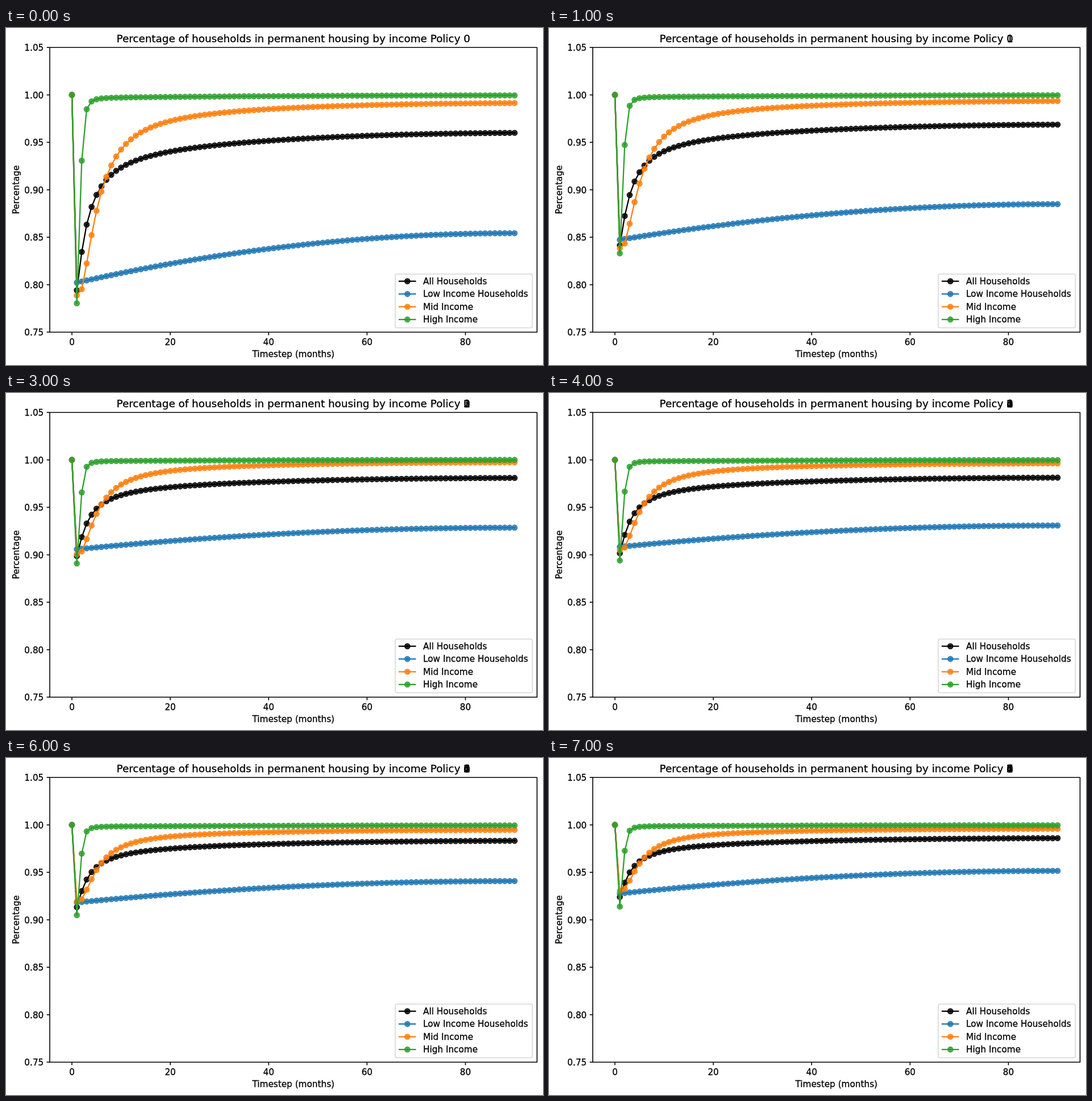
These frames come from a looping animation (945x593 px, 8 s). An HTML page with a canvas:

```html
<!DOCTYPE html>
<html lang="en">
<head>
<meta charset="utf-8">
<title>Permanent housing by income</title>
<style>
  html, body { margin: 0; width: 100%; height: 100%; overflow: hidden; background: #fff; }
  canvas { display: block; width: 945px; height: 593px; }
</style>
</head>
<body>
<canvas id="chart"></canvas>
<script>
const W = 945, H = 593, STEP = 1000, MONTHS = 90;
const LEFT = 77, RIGHT = 934.5, TOP = 34.2, BOTTOM = 535.2;
const MID_X = (LEFT + RIGHT) / 2;
const FONT = '"DejaVu Sans", sans-serif';

// Where each policy lies along the key values below.
const POLICIES = [0, 1, 2, 3, 3.33, 4, 4.33, 5];

// low, high: share after the shock and at the end, by policy.
// The recovery mixes a fast rise (rate, power, delay) with a slow drift.
const series = [
  {
    name: 'All Households', color: '#000000',
    drift: .1, rate: .36, power: 1.2, delay: 0,
    low: [.7941, .8414, .8762, .8986, .9079, .9241],
    high: [.96, .9687, .975, .981, .9819, .986]
  },
  {
    name: 'Low Income Households', color: '#1f77b4',
    drift: 1, rate: 1, power: 1, delay: 0,
    low: [.8022, .8474, .8822, .9058, .9136, .9277],
    high: [.8543, .8849, .9106, .9286, .9355, .9516]
  },
  {
    name: 'Mid Income', color: '#ff7f0e',
    drift: .05, rate: .106, power: 1.65, delay: .5,
    low: [.7887, .8384, .8789, .9004, .9136, .9304],
    high: [.9914, .9935, .9941, .9974, .9941, .9959]
  },
  {
    name: 'High Income', color: '#2ca02c',
    drift: .012, rate: 2.27, power: 2.9, delay: 0,
    low: [.7804, .833, .8681, .8908, .9004, .9139],
    high: [.9995, .9996, .9992, 1, .9993, .9996]
  }
];

const px = month => 116 + month * 8.656;
const py = value => 117.7 + (1 - value) * 1670;
const mix = (a, b, k) => a + (b - a) * k;

function sample(keys, at) {
  const i = Math.floor(at);
  return mix(keys[i], keys[i + 1] ?? keys[i], at - i);
}

// Share of the recovery still to come: 1 in month 1, 0 in the last month.
function gap(month, { drift, rate, power, delay }) {
  const rise = m => 1 / (1 + rate * Math.max(0, m - 1 - delay) ** power);
  const rest = rise(MONTHS);
  const fast = (rise(month) - rest) / (1 - rest);
  const slow = ((MONTHS - month) / (MONTHS - 1)) ** 2;
  return mix(fast, slow, drift);
}

function curve(s, policy) {
  const at = POLICIES[policy];
  const low = sample(s.low, at), high = sample(s.high, at);
  const points = [[px(0), py(1)]];
  for (let m = 1; m <= MONTHS; m++) points.push([px(m), py(mix(high, low, gap(m, s)))]);
  return points;
}

const canvas = document.getElementById('chart');
const ctx = canvas.getContext('2d');
const ratio = window.devicePixelRatio || 1;
canvas.width = W * ratio;
canvas.height = H * ratio;
ctx.scale(ratio, ratio);

function text(str, x, y, align = 'center', size = 15.28) {
  ctx.font = `${size}px ${FONT}`;
  ctx.textAlign = align;
  ctx.fillStyle = ctx.strokeStyle = '#000';
  ctx.lineWidth = .3;
  ctx.fillText(str, x, y);
  ctx.strokeText(str, x, y);
}

function path(points, color, width) {
  ctx.beginPath();
  points.forEach(([x, y]) => ctx.lineTo(x, y));
  ctx.strokeStyle = color;
  ctx.lineWidth = width;
  ctx.lineJoin = 'round';
  ctx.stroke();
}

function disc(x, y, r) {
  ctx.beginPath();
  ctx.arc(x, y, r, 0, Math.PI * 2);
}

function marker([x, y], color) {
  ctx.fillStyle = ctx.strokeStyle = color;
  ctx.lineWidth = 1.53;
  ctx.globalAlpha = .78;
  disc(x, y, 4.58);
  ctx.fill();
  ctx.globalAlpha = .9;
  ctx.stroke();
  disc(x, y, 2.3);
  ctx.fill();
  ctx.globalAlpha = 1;
}

function plot(points, color, marked = points) {
  path(points, color, 2.29);
  marked.forEach(p => marker(p, color));
}

function axes() {
  ctx.strokeStyle = '#000';
  ctx.lineWidth = 1.6;
  ctx.strokeRect(LEFT, TOP, RIGHT - LEFT, BOTTOM - TOP);
  for (let m = 0; m <= 80; m += 20) {
    path([[px(m), BOTTOM], [px(m), BOTTOM + 5.4]], '#000', 1.6);
    text(m, px(m), 558);
  }
  for (let i = 0; i <= 6; i++) {
    const v = .75 + i * .05, y = py(v);
    path([[LEFT - 5.4, y], [LEFT, y]], '#000', 1.6);
    text(v.toFixed(2), 66.3, y + 5.8, 'right');
  }
  text('Timestep (months)', MID_X, 579);
  ctx.save();
  ctx.translate(22.5, 284.6);
  ctx.rotate(-Math.PI / 2);
  text('Percentage', 0, 0);
  ctx.restore();
}

function legend() {
  ctx.beginPath();
  ctx.roundRect(685, 433, 241.3, 94.6, 3);
  ctx.fillStyle = 'rgba(255,255,255,.8)';
  ctx.fill();
  ctx.strokeStyle = '#d6d6d6';
  ctx.lineWidth = 1.53;
  ctx.stroke();
  series.forEach(({ name, color }, i) => {
    const y = 445.6 + i * 22.45;
    plot([[691, y], [721.5, y]], color, [[706.3, y]]);
    text(name, 734, y + 5.4, 'left');
  });
}

// Titles pile up: every earlier policy number stays underneath.
function title(policy) {
  const str = 'Percentage of households in permanent housing by income Policy 0';
  text(str, MID_X, 25, 'center', 18.36);
  const end = MID_X + ctx.measureText(str).width / 2;
  for (let n = 1; n <= policy; n++) text(n, end, 25, 'right', 18.36);
}

function draw(policy) {
  ctx.fillStyle = '#fff';
  ctx.fillRect(0, 0, W, H);
  for (const s of series) plot(curve(s, policy), s.color);
  axes();
  title(policy);
  legend();
}

const start = performance.now();
let shown = -1;

function tick() {
  const policy = Math.floor((performance.now() - start) / STEP) % POLICIES.length;
  if (policy !== shown) draw(shown = policy);
  requestAnimationFrame(tick);
}
tick();
</script>
</body>
</html>
```
